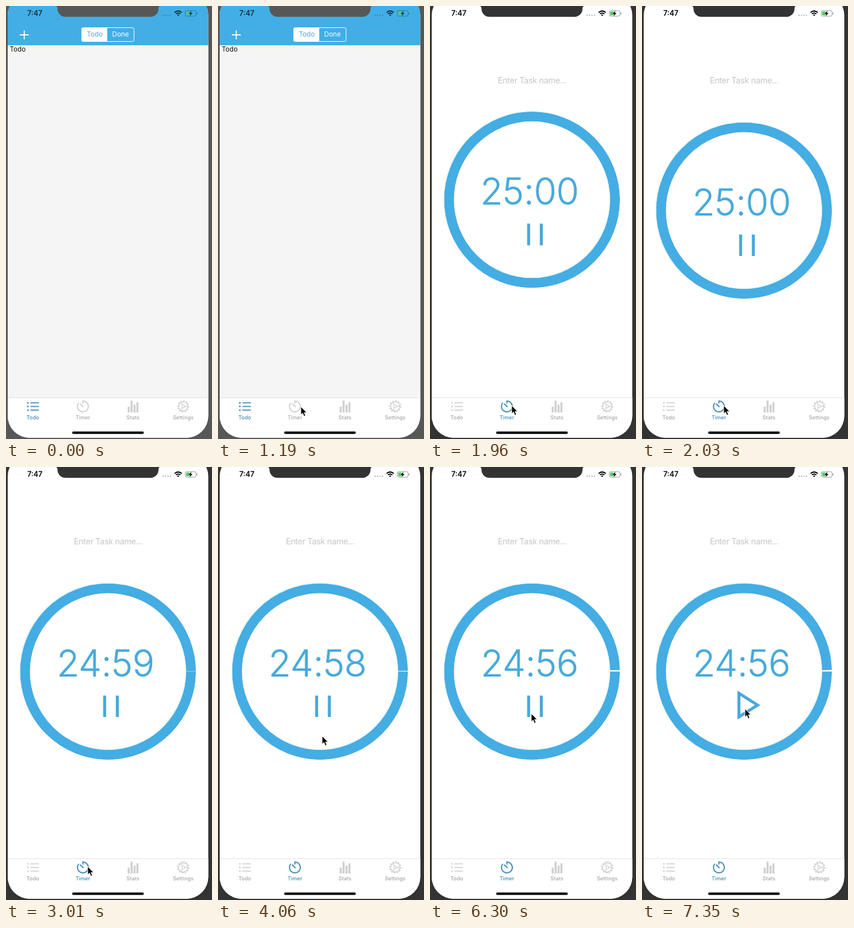
Recreate the animation shown at these times as an HTML page. Size 358 px wide and 750 px high, loop 8 s.

```html
<!DOCTYPE html>
<html lang="en">
<head>
<meta charset="utf-8">
<title>Task timer</title>
<style>
  html, body { margin: 0; width: 100%; height: 100%; overflow: hidden; }
  svg { display: block; width: 358px; height: 750px; }
  text { font-family: Inter, Roboto, sans-serif; }
  .mid { text-anchor: middle; }
  .line { fill: none; stroke: currentColor; stroke-width: 2; }
  .tab { color: #d0d0d0; }
  .tab text { font-size: 9px; font-weight: 500; letter-spacing: .1px; fill: #a5a5a5; text-anchor: middle; }
  .tab.active { color: #3f8bb5; }
  .tab.active text { fill: #3f8bb5; }
  .raised { filter: drop-shadow(.8px .8px .5px #7b8a93) drop-shadow(-1px -1px 1.2px #cdf5f3); }
</style>
</head>
<body>
<svg viewBox="0 0 358 750">
  <defs>
    <clipPath id="screenShape"><rect x="3" y="-22" width="348.5" height="770" rx="38"/></clipPath>
  </defs>

  <rect class="bezel" width="358" height="750"/>
  <g clip-path="url(#screenShape)">
    <rect width="358" height="750" fill="#fff"/>

    <g id="todoScreen">
      <rect y="67" width="358" height="611" fill="#f5f5f5"/>
      <rect width="358" height="68" fill="#42aee5"/>
      <path d="M24 50h15.5M31.7 42.3v15.5" stroke="#fff" stroke-width="1.8"/>
      <rect x="131.5" y="37.5" width="91" height="24" rx="3" fill="none" stroke="#fff"/>
      <path d="M176 37.5h-42a3 3 0 0 0-3 3v18a3 3 0 0 0 3 3h42z" fill="#fff"/>
      <g class="mid" font-size="11.6">
        <text class="mid" x="154.3" y="53" fill="#42aee5">Todo</text>
        <text class="mid" x="199" y="53" fill="#fff">Done</text>
      </g>
      <text x="6.5" y="79" font-size="11.6" fill="#111">Todo</text>
    </g>

    <g id="timerScreen">
      <text class="mid" x="177.5" y="133.5" font-size="14.5" letter-spacing="-.4" fill="#c6c6ca">Enter Task name...</text>
      <g id="dial" fill="#45aae0">
        <circle class="raised" cx="177.3" cy="354.3" r="144.2" fill="none" stroke="#44ade4" stroke-width="16.4"/>
        <circle id="gap" cx="177.3" cy="354.3" r="144.2" fill="none" stroke="#fff" stroke-width="17" pathLength="1500"/>
        <text id="clock" class="raised mid" x="173" y="362.5" font-size="64" font-weight="300" letter-spacing="-.5"></text>
        <path id="pause" class="raised" d="M169 396h5v37h-5zM191 396h5v37h-5z"/>
        <path id="play" class="raised" d="M168.5 392L201 412.5 168.5 433z" fill="none" stroke="#45aae0" stroke-width="4.5"/>
      </g>
    </g>

    <path d="M0 678h358v72h-358z" fill="#fff"/>
    <path d="M0 678.5h358" stroke="#e2e2e2"/>
    <g class="tab" id="todoTab">
      <path class="line" d="M42.5 687.3h14.5M42.5 693.6h14.5M42.5 699.9h14.5" style="stroke-width:1.7"/>
      <path class="line" d="M38 687.3h0M38 693.6h0M38 699.9h0" stroke-linecap="round" style="stroke-width:3"/>
      <text x="46.6" y="716">Todo</text>
    </g>
    <g class="tab" id="timerTab">
      <path class="line" d="M133.6 688.5v-4.3a9.4 9.4 0 1 1-7 3.2"/>
      <path class="line" d="M129.3 689.2l4.8 4.8" stroke-linecap="round"/>
      <text x="133.6" y="716">Timer</text>
    </g>
    <g class="tab">
      <path fill="currentColor" d="M211.5 694h3.5v10h-3.5zM216.5 683.5h3.5v20.5h-3.5zM221.6 690.5h3.5v13.5h-3.5zM226.6 686.5h3.5v17.5h-3.5z"/>
      <text x="220.8" y="716">Stats</text>
    </g>
    <g class="tab">
      <circle class="line" cx="308" cy="693.5" r="8" style="stroke-width:1.5"/>
      <circle class="line" cx="308" cy="693.5" r="9.6" pathLength="24" stroke-dasharray="1"/>
      <circle class="line" cx="308" cy="693.5" r="2.4" style="stroke-width:1.2"/>
      <path class="line" d="M310.4 693.5h5.5M306.8 691.4l-2.7-4.8M306.8 695.6l-2.7 4.8" style="stroke-width:1.3"/>
      <text x="308" y="716">Settings</text>
    </g>
    <rect x="115" y="737" width="124.5" height="4.2" rx="2.1"/>

    <g id="status">
      <text x="37" y="17" font-size="12.5" font-weight="600">7:47</text>
      <path d="M273 16h0M277.3 16h0M281.6 16h0M285.9 16h0" stroke="#000" stroke-opacity=".28" stroke-width="2.4" stroke-linecap="round"/>
      <g fill="none" stroke="#000" stroke-width="2">
        <path d="M293 11.2q6.2-5.2 12.4 0M295.3 13.8q3.9-3.2 7.8 0"/>
        <path d="M299.2 17.2l-1.4-1.6q1.4-1 2.8 0z" fill="#000" stroke-width=".8"/>
      </g>
      <rect x="311.5" y="8" width="18.8" height="9.6" rx="2.8" fill="none" stroke="#000" stroke-opacity=".4"/>
      <rect x="313" y="9.5" width="6.5" height="6.6" rx="1.3" fill="#55cc68"/>
      <path d="M322.4 8.3l-5 5.2h3l-1.2 3.9 5-5.2h-3z"/>
      <path d="M331.9 11.2v3.2" stroke="#000" stroke-opacity=".4" stroke-width="1.3"/>
    </g>
  </g>
  <path class="bezel" d="M86 0h182q-3 0-3 5a14 14 0 0 1-14 13.8H104A14 14 0 0 1 89.5 5q0-5-3.500-5z"/>

  <path id="cursor" d="M0 0v14.2l3.2-3 2.400 5.500 2.500-1.100-2.400-5.300h4.400z" stroke="#fff" stroke-width=".9"/>
</svg>
<script>
  const LOOP = 8000, SWITCH = 1750, SETTLE = 2030;
  const FIRST_TICK = 2310, TICK = 1120, RUN_START = 1900, PAUSED = 6720;
  // time, x, y of the pointer tip
  const pointerPath = [
    [840, 190, 749], [1050, 154, 711], [1190, 144, 694], [1540, 142, 692],
    [3010, 142, 692], [3570, 181, 466], [5600, 181, 466], [6230, 176, 427],
    [6440, 176, 427], [6580, 178, 422], [6790, 179, 419]
  ];

  const $ = id => document.getElementById(id);
  const show = (id, on) => $(id).style.display = on ? '' : 'none';
  const clamp = v => Math.min(1, Math.max(0, v));
  const ease = v => v * v * (3 - 2 * v);
  const lerp = (a, b, k) => a + (b - a) * k;

  function pointerAt(t) {
    const next = pointerPath.findIndex(p => p[0] > t);
    if (next < 0) return pointerPath.at(-1).slice(1);
    const [t0, x0, y0] = pointerPath[next - 1], [t1, x1, y1] = pointerPath[next];
    const k = (t - t0) / (t1 - t0), e = t < 1190 ? k : ease(k);
    return [lerp(x0, x1, e), lerp(y0, y1, e)];
  }

  function render(t) {
    const onTimer = t >= SWITCH, paused = t >= PAUSED;
    show('todoScreen', !onTimer);
    show('timerScreen', onTimer);
    $('todoTab').classList.toggle('active', !onTimer);
    $('timerTab').classList.toggle('active', onTimer);
    $('status').setAttribute('opacity', onTimer ? 1 : .72);

    const shade = Math.round(lerp(87, 51, clamp((t - 1680) / 210)));
    document.querySelectorAll('.bezel').forEach(b => b.setAttribute('fill', `rgb(${shade},${shade},${shade})`));

    $('dial').setAttribute('transform', `translate(0 ${t < SETTLE ? -18.7 : 0})`);
    const runTime = Math.min(t, PAUSED);
    const ticks = Math.max(0, Math.floor((runTime - FIRST_TICK) / TICK) + 1);
    const left = 1500 - ticks;
    $('clock').textContent = `${Math.floor(left / 60)}:${String(left % 60).padStart(2, '0')}`;
    const elapsed = Math.max(0, (runTime - RUN_START) / TICK);
    $('gap').setAttribute('stroke-dasharray', `0 ${1500 - elapsed} ${elapsed} 0`);
    show('pause', !paused);
    show('play', paused);

    const pointerVisible = t >= pointerPath[0][0];
    show('cursor', pointerVisible);
    if (pointerVisible) $('cursor').setAttribute('transform', `translate(${pointerAt(t)})`);
  }

  const start = performance.now();
  function frame() {
    render((performance.now() - start) % LOOP);
    requestAnimationFrame(frame);
  }
  frame();
</script>
</body>
</html>
```
